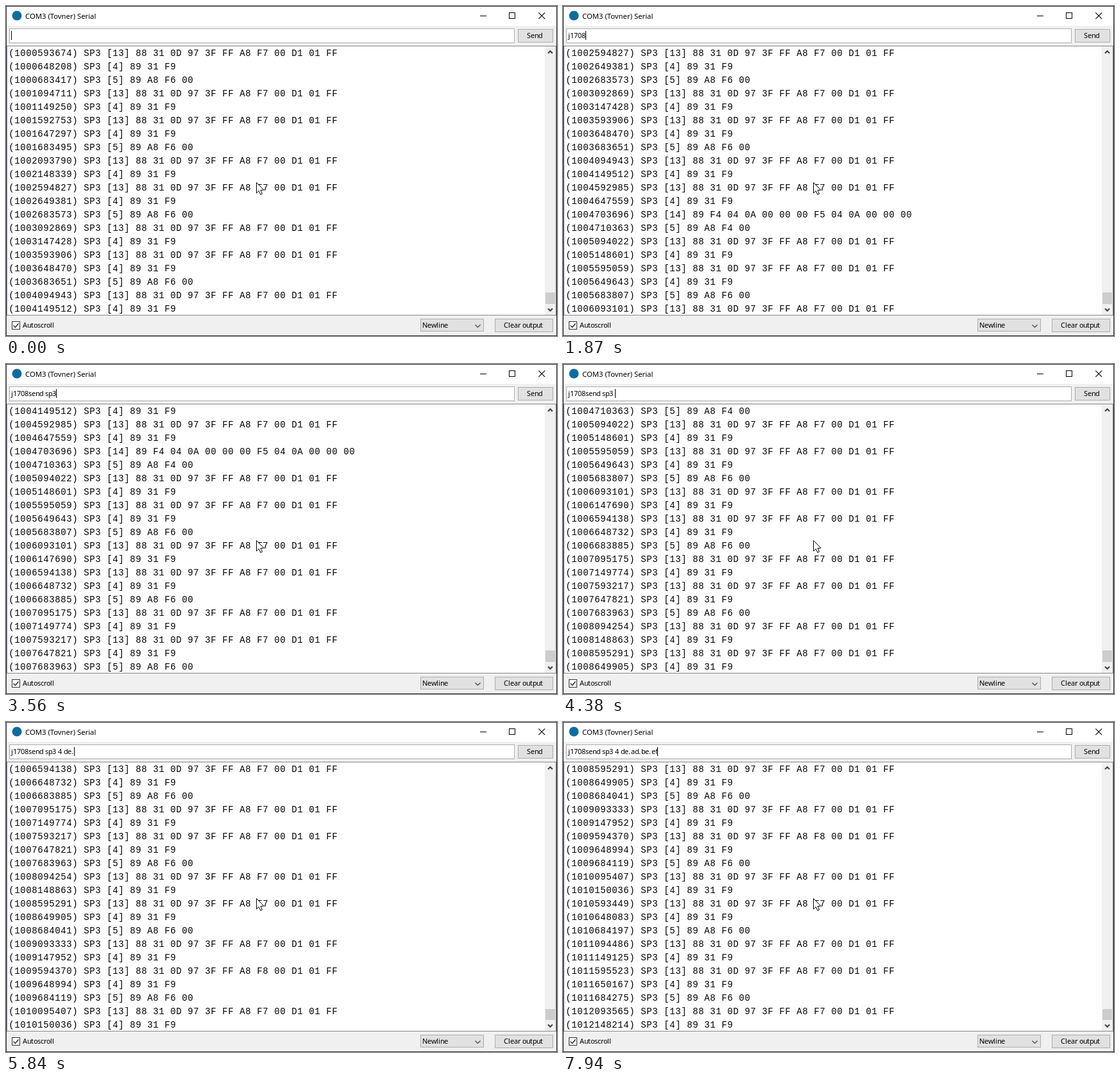
Animation of 859 by 515 pixels, one loop 8 s. Source, as an HTML page with a canvas:

```html
<!DOCTYPE html>
<html lang="en">
<head>
<meta charset="utf-8">
<title>Serial monitor</title>
<style>
  html, body { margin: 0; width: 100%; height: 100%; overflow: hidden; background: #f0f0f0; }
  canvas { display: block; }
</style>
</head>
<body>
<canvas id="stage" width="859" height="515"></canvas>
<script>
const ctx = document.getElementById('stage').getContext('2d');
const LOOP = 8000;
const ROWS = 20;
const BLINK = 500;
const UI_FONT = '11px "Noto Sans", sans-serif';
const TITLE_FONT = '11.3px "Noto Sans", sans-serif';
const LOG_FONT = '14px "Liberation Mono", monospace';
const LOG_PITCH = 9;

const log = buildLog();
const keys = buildKeys([
  ['j1708', 790, 1510],
  ['send ', 2140, 2520],
  ['sp3', 2840, 3560],
  [' 4 ', 3940, 4970],
  ['de.ad.', 5170, 6500],
  ['be.ef', 7010, 7940]
]);

// The bus repeats a status pair every half second and a heartbeat every
// second; once, a longer diagnostic pair replaces the heartbeat.
function buildLog() {
  const rows = [];
  const add = (micros, packet) => rows.push({
    at: (micros - 4594000) * 0.00098 + 388,
    text: `(${1e9 + micros}) SP3 ${packet}`
  });
  for (let half = 0; half < 24; half++) {
    const second = Math.floor(half / 2);
    const drift = 116 * Math.floor((half + 1) / 3) + 1037 * ((half + 1) % 3);
    const status = 592637 + half * 500000 + drift;
    const level = half === 18 ? 'F8' : 'F7';
    add(status, `[13] 88 31 0D 97 3F FF A8 ${level} 00 D1 01 FF`);
    add(status + 54534 + 5 * half, '[4] 89 31 F9');
    if (half === 8) {
      add(4703696, '[14] 89 F4 04 0A 00 00 00 F5 04 0A 00 00 00');
      add(4710363, '[5] 89 A8 F4 00');
    } else if (half % 2 === 0) {
      add(683417 + second * 1000078, '[5] 89 A8 F6 00');
    }
  }
  return rows;
}

// Each burst of typing has an even pace from its first to its last key.
function buildKeys(bursts) {
  return bursts.flatMap(([text, from, to]) =>
    [...text].map((ch, i) => ({ ch, at: from + (to - from) * i / (text.length - 1) })));
}

function fill(x, y, w, h, color) {
  ctx.fillStyle = color;
  ctx.fillRect(x, y, w, h);
}

function box(x, y, w, h, border, inside) {
  fill(x, y, w, h, border);
  fill(x + 1, y + 1, w - 2, h - 2, inside);
}

function stroke(points, color, width) {
  ctx.beginPath();
  points.forEach(([x, y]) => ctx.lineTo(x, y));
  ctx.strokeStyle = color;
  ctx.lineWidth = width;
  ctx.stroke();
}

function chevron(x, y, half, dir, width) {
  const rise = dir * half / 2;
  stroke([[x - half, y - rise], [x, y + rise], [x + half, y - rise]], '#404040', width);
}

// Interface text sits on whole-pixel advances; returns the end position.
function uiText(str, x, y) {
  ctx.font = UI_FONT;
  ctx.fillStyle = '#000';
  for (const ch of str) {
    ctx.fillText(ch, x, y);
    x += ch === '.' ? 4 : Math.floor(ctx.measureText(ch).width + 0.18);
  }
  return x;
}

function drawTitleBar() {
  fill(1, 1, 857, 30, '#fff');
  ctx.fillStyle = '#0e6d9e';
  ctx.beginPath();
  ctx.arc(17, 15, 7.5, 0, Math.PI * 2);
  ctx.fill();
  ctx.font = TITLE_FONT;
  ctx.fillStyle = '#000';
  ctx.fillText('COM3 (Tovner) Serial', 30, 20);
  fill(739, 15, 10, 1, '#000');
  box(784, 10, 10, 10, '#000', '#fff');
  stroke([[830.3, 10.3], [840.2, 20.2]], '#000', 1.1);
  stroke([[840.2, 10.3], [830.3, 20.2]], '#000', 1.1);
}

function drawInput(t) {
  box(5, 35, 788, 23, '#abadb3', '#fff');
  const typed = keys.filter(key => key.at <= t);
  const end = uiText(typed.map(key => key.ch).join(''), 8, 50);
  const lastKey = typed.length ? typed.at(-1).at : -190;
  if (t - lastKey < BLINK) fill(end, 39, 1, 14, '#000');
  box(798, 36, 55, 21, '#adadad', '#e1e1e1');
  uiText('Send', 812, 50);
}

function drawLog(t) {
  box(1, 62, 857, 421, '#828790', '#fff');
  ctx.font = LOG_FONT;
  ctx.letterSpacing = '0px';
  ctx.letterSpacing = `${LOG_PITCH - ctx.measureText('0').width}px`;
  ctx.fillStyle = '#000';
  log.filter(row => row.at <= t).slice(-ROWS)
    .forEach((row, i) => ctx.fillText(row.text, 4.3, 78 + 21 * i));
  ctx.letterSpacing = '0px';

  fill(840, 63, 17, 419, '#f0f0f0');
  const top = Math.round(447 + t / 10000);
  fill(841, top, 15, 465 - top, '#cdcdcd');
  chevron(848.5, 72, 3.5, -1, 2);
  chevron(848.5, 474, 3.5, 1, 2);
}

function drawFooter() {
  box(9, 492, 13, 13, '#333', '#fff');
  stroke([[11.5, 498.5], [14.5, 501.5], [19.5, 495.5]], '#222', 1.3);
  uiText('Autoscroll', 26, 502);
  box(646, 488, 99, 20, '#adadad', '#e1e1e1');
  uiText('Newline', 649, 502);
  chevron(735.5, 499.5, 4, 1, 1.2);
  box(762, 488, 91, 21, '#adadad', '#e1e1e1');
  uiText('Clear output', 776, 502);
}

function drawPointer(x, y) {
  const outline = [[0, 0], [0, 16.5], [3.8, 13], [6.4, 18.8], [9, 17.6], [6.5, 12], [11.5, 11.7]];
  ctx.beginPath();
  outline.forEach(([dx, dy]) => ctx.lineTo(x + dx, y + dy));
  ctx.closePath();
  ctx.fillStyle = '#fff';
  ctx.fill();
  ctx.strokeStyle = '#000';
  ctx.lineWidth = 1;
  ctx.stroke();
}

function draw(t) {
  box(0, 0, 859, 515, '#2d3038', '#f0f0f0');
  drawTitleBar();
  drawInput(t);
  drawLog(t);
  drawFooter();
  drawPointer(390.5, 275.5);
}

let start;
function tick(now) {
  start ??= now;
  draw((now - start) % LOOP);
  requestAnimationFrame(tick);
}
draw(0);
requestAnimationFrame(tick);
</script>
</body>
</html>
```
